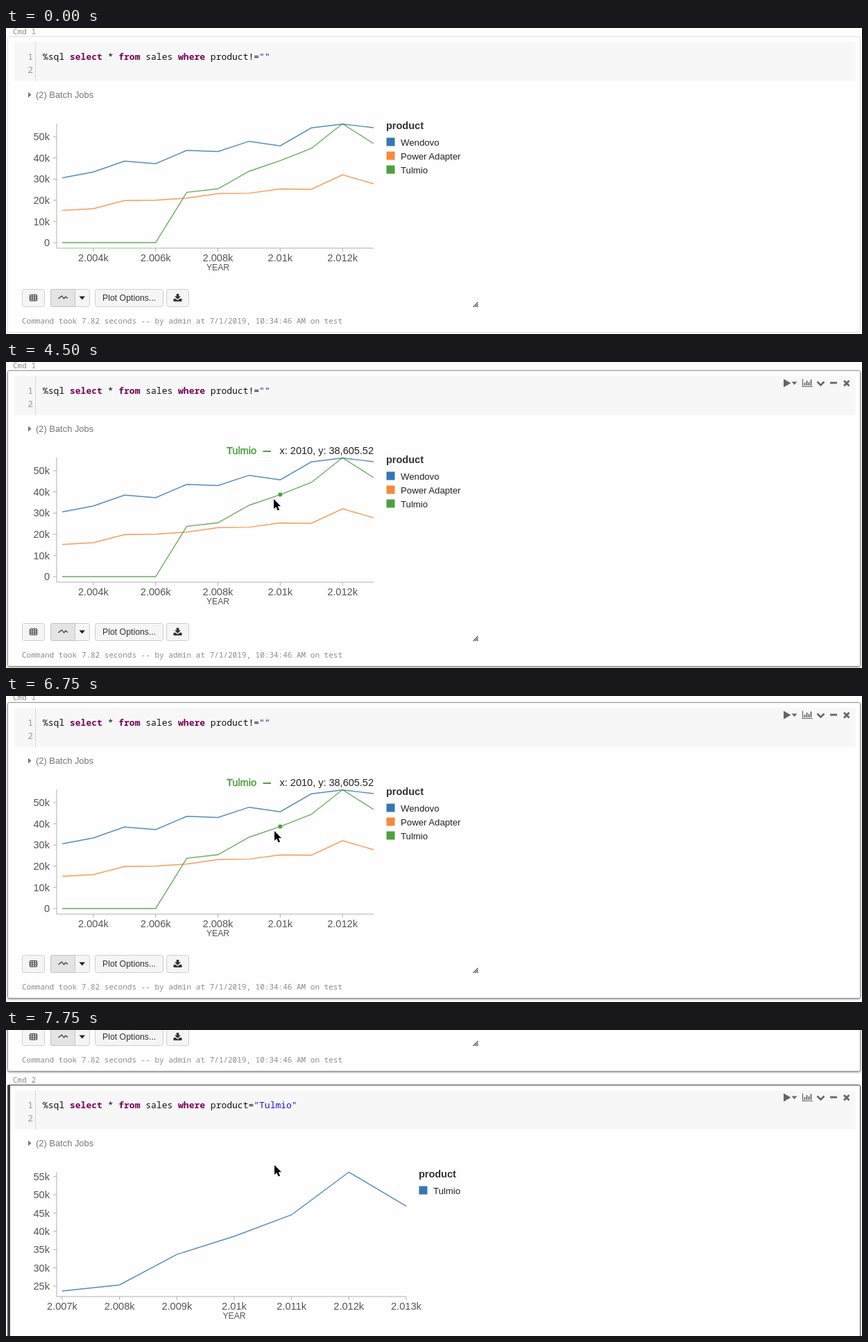
An HTML page that plays this animation: 1234x442 px, repeating every 8 s.

```html
<!DOCTYPE html>
<html lang="en">
<head>
<meta charset="utf-8">
<title>Sales notebook</title>
<style>
html, body { margin: 0; width: 100%; height: 100%; overflow: hidden; background: #fefefe; }
svg { display: block; }
text { font-family: "Liberation Sans", Arial, sans-serif; white-space: pre; }
.mono { font-family: "Noto Sans Mono", "DejaVu Sans Mono", monospace; }
.small { font-size: 11px; fill: #8c8c8c; }
.code { font-size: 13px; fill: #111; }
.num { font-size: 13px; fill: #999; text-anchor: end; }
.key { font-weight: bold; fill: #770055; }
.str { fill: #1c12d8; }
.axis { fill: none; stroke: #b0b0b0; }
.tick { font-size: 14.6px; fill: #555; }
.name { font-size: 12.2px; fill: #555; text-anchor: middle; }
.head { font-size: 14.5px; font-weight: bold; fill: #333; }
.item { font-size: 13.2px; fill: #222; }
.line { fill: none; stroke-width: 1.4; opacity: .85; }
.btn { fill: #f5f5f5; stroke: #cfcfcf; }
.frame { fill: #fefefe; stroke: #dedede; }
.hover .frame { stroke: #999; filter: drop-shadow(0 1px 1.5px rgba(0,0,0,.45)); }
.tools { fill: #666; stroke: #666; stroke-width: 0; }
#one .tools { display: none; }
#one.hover .tools { display: inline; }
</style>
</head>
<body>
<svg id="stage" width="1234" height="442" viewBox="0 0 1234 442"></svg>
<script>
const BLUE = '#3578b4', ORANGE = '#f58a3c', GREEN = '#4f9f41';
const LOOP = 8000;

const text = (x, y, cls, s, extra = '') => `<text x="${x}" y="${y}" class="${cls}" ${extra}>${s}</text>`;
const path = (d, extra = '') => `<path d="${d}" ${extra}/>`;
const rect = (x, y, w, h, extra = '') => `<rect x="${x}" y="${y}" width="${w}" height="${h}" ${extra}/>`;
const key = s => `<tspan class="key">${s}</tspan>`;
const str = s => `<tspan class="str">"${s}"</tspan>`;

// Run menu, chart, collapse, minimise and close icons
const tools = `<g class="tools">
  ${path('M1121 24.5L1131.5 30.5L1121 36.5Z')}
  ${path('M1132.5 28.5h8l-4 4.5z')}
  ${path('M1148.5 24.5V35.5H1163', 'fill="none" stroke-width="1.2"')}
  ${path('M1151.5 34v-4M1154.5 34v-7M1157.5 34v-5M1160.5 34v-8.5', 'stroke-width="1.8"')}
  ${path('M1169.5 28.5l5 5l5-5', 'fill="none" stroke-width="2.6"')}
  ${rect(1188, 28.7, 10, 2.8)}
  ${path('M1208 27l7.5 7.5M1215.5 27l-7.5 7.5', 'stroke-width="2.8"')}
</g>`;

function chart(c) {
  const px = i => 81 + i * c.dx;
  const end = px(c.years);
  let s = path(`M73 138V318H${end}`, 'class="axis"');
  c.yTicks.forEach((v, i) => {
    const y = c.y0 - i * c.dy;
    s += path(`M68 ${y}h5`, 'class="axis"') + text(63, y + 5.2, 'tick', v, 'text-anchor="end"');
  });
  c.xTicks.forEach((v, i) => {
    const x = px(c.first + i * c.step);
    s += path(`M${x} 318v5`, 'class="axis"') + text(x, 337.2, 'tick', v, 'text-anchor="middle"');
  });
  s += text(c.nameX, 349.6, 'name', 'YEAR') + text(end + c.gap, 145.5, 'head', 'product');
  c.series.forEach(({ name, color, ys }, i) => {
    const y = 158.5 + i * 20;
    s += path('M' + ys.map((v, k) => `${px(k).toFixed(1)} ${v}`).join('L'), `class="line" stroke="${color}"`);
    s += rect(end + c.gap + .5, y, 12, 12, `fill="${color}"`) + text(end + c.gap + 21, y + 11, 'item', name);
  });
  return s;
}

const buttons = `
  ${rect(23.5, 377.5, 32, 25, 'rx="3" class="btn"')}
  ${rect(64.5, 377.5, 56, 25, 'rx="3" class="btn"')}
  ${path('M67 377.5H99.5V402.5H67Q64.5 402.5 64.5 400V380Q64.5 377.5 67 377.5Z', 'fill="#e4e4e4" stroke="#c4c4c4"')}
  ${rect(128.5, 377.5, 98, 25, 'rx="3" class="btn"')}
  ${rect(231.5, 377.5, 32, 25, 'rx="3" class="btn"')}
  ${rect(34.5, 385.5, 10, 8.5, 'rx="1" fill="none" stroke="#333" stroke-width="1.2"')}
  ${path('M34.5 388.3h10M34.5 391.2h10M37.8 385.5v8.5M41.2 385.5v8.5', 'stroke="#333"')}
  ${path('M75.5 391l3-2.5l2-1.5l3 4l2.5-3l3 2.5', 'fill="none" stroke="#333" stroke-width="1.2"')}
  ${path('M105.5 387.5h8.5l-4.2 5z', 'fill="#222"')}
  ${text(139, 394, '', 'Plot Options...', 'font-size="12.3" fill="#333"')}
  ${path('M245.7 384h3.6v3.5h2.7l-4.5 4.5l-4.5-4.5h2.7zM241.5 391h3l3 2.5l3-2.5h3v4h-12z', 'fill="#333"')}
  ${path('M673.5 403l7-7M676.5 403l4-4M679.3 403l1.4-1.4', 'stroke="#555" stroke-width="1.3"')}`;

function cell(n, code, plot) {
  return text(10, 9, 'mono small', 'Cmd ' + n)
    + rect(2.5, 12.5, 1229, 427, `rx="2" class="frame" ${n === 2 ? 'style="stroke:#333"' : ''}`)
    + (n === 2 ? rect(2, 12.5, 4, 427, 'fill="#3c3c3c"') : '')
    + rect(12, 20, 1213, 56.5, 'fill="#f7f7f7"')
    + path('M42.5 20V76.5', 'stroke="#d8d8d8"')
    + text(39, 46.3, 'mono num', 1) + text(39, 65.3, 'mono num', 2)
    + text(53, 46.3, 'mono code', code)
    + tools
    + path('M32 92.5l4.5 4l-4.5 4z', 'fill="#777"')
    + text(43, 101, '', '(2) Batch Jobs', 'font-size="12.9" fill="#777"')
    + chart(plot) + buttons
    + text(23, 427, 'mono small', 'Command took 7.82 seconds -- by admin at 7/1/2019, 10:34:46 AM on test');
}

const query = tail => `%sql ${key('select')} * ${key('from')} sales ${key('where')} product${tail}`;

const all = {
  dx: 44.9, years: 10, first: 1, step: 2, y0: 310, dy: 30.6, nameX: 305.5, gap: 18,
  yTicks: ['0', '10k', '20k', '30k', '40k', '50k'],
  xTicks: ['2.004k', '2.006k', '2.008k', '2.01k', '2.012k'],
  series: [
    { name: 'Wendovo', color: BLUE, ys: [216.5, 208, 192.3, 196, 176.8, 178.5, 163.7, 170.2, 144.3, 138.7, 144] },
    { name: 'Power Adapter', color: ORANGE, ys: [263.5, 261, 249.3, 248.8, 245.7, 239.3, 238.6, 232.5, 233, 212, 225] },
    { name: 'Tulmio', color: GREEN, ys: [310, 310, 310, 310, 237.4, 232.3, 207, 191.6, 174, 138.3, 167] }
  ]
};
const one = {
  dx: 82.65, years: 6, first: 0, step: 1, y0: 303, dy: 26.4, nameX: 329, gap: 18,
  yTicks: ['25k', '30k', '35k', '40k', '45k', '50k', '55k'],
  xTicks: ['2.007k', '2.008k', '2.009k', '2.01k', '2.011k', '2.012k', '2.013k'],
  series: [{ name: 'Tulmio', color: BLUE, ys: [310, 301.2, 257.2, 231, 200, 138.3, 187.3] }]
};

const tip = (id, name, color, value, y) => `<g id="${id}">
  ${text(361, 133, '', name, `font-size="14.5" text-anchor="end" fill="${color}" stroke="${color}" stroke-width=".5"`)}
  ${rect(370.5, 128, 11.5, 2, `fill="${color}"`)}
  ${text(530, 133, '', 'x: 2010, y: ' + value, 'font-size="14.5" text-anchor="end" fill="#222"')}
  <circle cx="395.3" cy="${y}" r="3" fill="${color}"/></g>`;

document.getElementById('stage').innerHTML = `<g id="page">
  <g id="one">${cell(1, query('!=' + str('')), all)}
    ${tip('green', 'Tulmio', GREEN, '38,605.52', 191.6)}
    ${tip('blue', 'Wendovo', BLUE, '45,692.18', 170.2)}</g>
  <g transform="translate(0 447)">${cell(2, query('=' + str('Tulmio')), one)}</g>
</g>
<g id="mouse">${path('M0 0V14l3.2-3l2.5 5.6l2.4-1l-2.4-5.4H10Z', 'stroke="#fff" stroke-width="2" paint-order="stroke" stroke-linejoin="round"')}</g>`;

// time, pointer x, pointer y, hovered series, scroll
const steps = [
  [0, -50, -50, '', 0],
  [750, 687, 300, '', 0],
  [1000, 596, 290, '', 0],
  [1250, 482, 270, '', 0],
  [1500, 412, 257, '', 0],
  [1750, 397, 254, '', 0],
  [2000, 395, 240, '', 0],
  [2250, 389, 213, '', 0],
  [2500, 384, 196, '', 0],
  [2750, 383, 193, '', 0],
  [3500, 385, 201, 'green', 0],
  [3750, 386, 201, 'green', 0],
  [4000, 386, 200, 'green', 0],
  [4250, 386, 199, 'green', 0],
  [4500, 386, 198, 'green', 0],
  [4750, 391, 179, 'blue', 0],
  [5000, 392, 176, 'blue', 0],
  [5250, 388, 190, 'green', 0],
  [5500, 387, 195, 'green', 0],
  [6250, 387, 195, 'green', 1],
  [6500, 387, 195, 'green', 2],
  [6750, 387, 195, 'green', 3],
  [7000, 387, 195, 'green', 80],
  [7250, 387, 195, 'green', 200],
  [7500, 387, 195, 'green', 315],
  [7750, 387, 195, 'green', 380]
];

const get = id => document.getElementById(id);
const [page, first, mouse, green, blue] = ['page', 'one', 'mouse', 'green', 'blue'].map(get);
let shown;

function draw() {
  const t = performance.now() % LOOP;
  const step = steps.findLast(s => s[0] <= t);
  if (step !== shown) {
    shown = step;
    const [, x, y, hover, scroll] = step;
    mouse.setAttribute('transform', `translate(${x} ${y})`);
    page.setAttribute('transform', `translate(0 ${-scroll})`);
    first.classList.toggle('hover', hover !== '');
    green.style.display = hover === 'green' ? '' : 'none';
    blue.style.display = hover === 'blue' ? '' : 'none';
  }
  requestAnimationFrame(draw);
}
draw();
</script>
</body>
</html>
```
